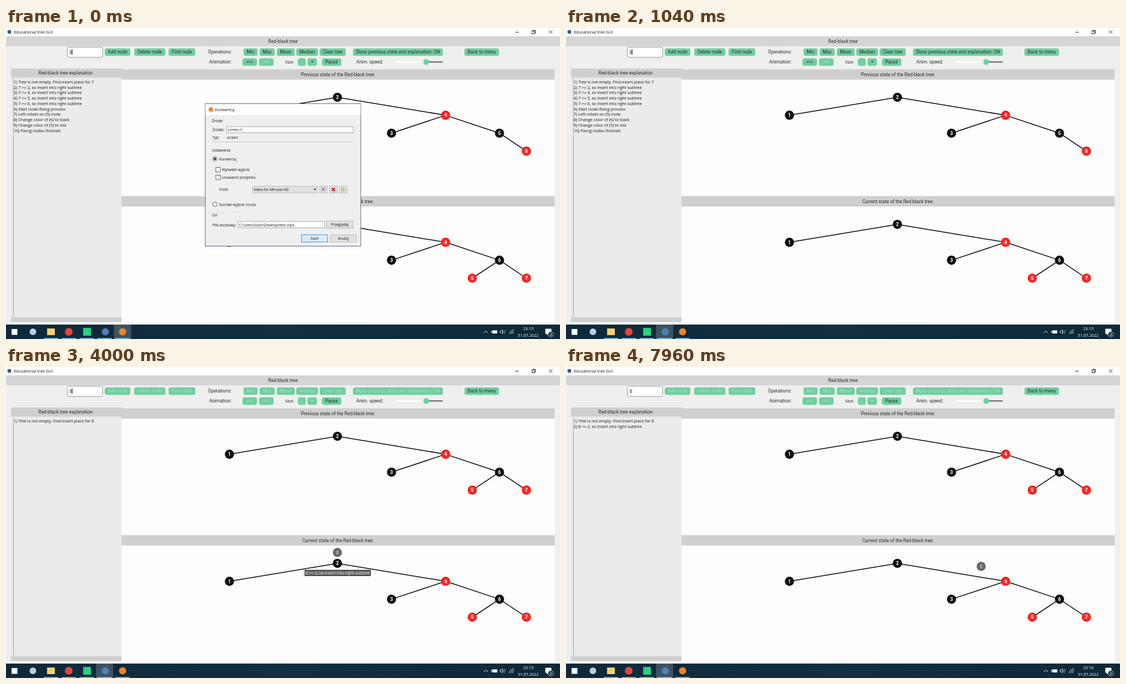
Recreate the animation shown at these times as an HTML page. Size 998x561 px, loop 8 s.

```html
<!DOCTYPE html>
<html lang="en">
<head>
<meta charset="utf-8">
<title>Educational tree GUI</title>
<style>
  html, body { margin: 0; width: 100%; height: 100%; overflow: hidden; background: #ededed; }
  svg { display: block; width: 998px; height: 561px; }
  text { font-family: "Open Sans", "Noto Sans", sans-serif; font-size: 7.3px; fill: #111; white-space: pre; }
  .label { font-family: Roboto, sans-serif; font-size: 8.35px; fill: #2b2b2b; }
  .small { font-size: 6.5px; }
  .key { font-family: Roboto, sans-serif; font-size: 8.6px; font-weight: 700; fill: #fff; }
  .off .label { fill: #a9dcc2; }
</style>
</head>
<body>
<svg id="stage" viewBox="0 0 998 561" xmlns="http://www.w3.org/2000/svg">
  <defs>
    <linearGradient id="bar">
      <stop offset="0" stop-color="#10283a"/>
      <stop offset=".5" stop-color="#112f40"/>
      <stop offset="1" stop-color="#0e2838"/>
    </linearGradient>
    <radialGradient id="red">
      <stop offset=".4" stop-color="#ff3030"/>
      <stop offset="1" stop-color="#f91212"/>
    </radialGradient>
  </defs>
</svg>
<script>
const LOOP = 8000, STEP = 40;
const DIALOG_END = 280, CLICK = 2720, INSERT = 2840, MINUTE = 4120, MOVE = 5704;
const SPEED = 0.0669, SLOPE = 0.1667;
const stage = document.getElementById('stage');

function add(parent, tag, attrs, content) {
  const el = document.createElementNS('http://www.w3.org/2000/svg', tag);
  for (const name in attrs) el.setAttribute(name, attrs[name]);
  if (content !== undefined) el.textContent = content;
  return parent.appendChild(el);
}
const group = (parent = stage) => add(parent, 'g', {});
const rect = (p, x, y, width, height, fill, extra) =>
  add(p, 'rect', { x, y, width, height, fill, ...extra });
const circle = (p, cx, cy, r, fill, extra) => add(p, 'circle', { cx, cy, r, fill, ...extra });
const path = (p, d, stroke, width = 1, fill = 'none') =>
  add(p, 'path', { d, stroke, fill, 'stroke-width': width });
// y is the middle of the capital letters
const text = (p, x, y, content, cls = '', extra) =>
  add(p, 'text', { x, y: y + 2.8, class: cls, ...extra }, content);
const centered = (p, x, y, content, cls, extra) =>
  text(p, x, y, content, cls, { 'text-anchor': 'middle', ...extra });
const show = (el, on) => el.setAttribute('visibility', on ? 'visible' : 'hidden');

// Window frame
rect(stage, 0, 0, 998, 535, '#efefef');
rect(stage, 0, 0, 998, 15, '#fff');
circle(stage, 6, 7, 3.5, '#2d5f93');
text(stage, 14, 7.3, 'Educational tree GUI', '', { style: 'font-size:7.4px' });
path(stage, 'M917 7.5h7M978 4l6.5 6.5M984.500 4l-6.500 6.500', '#222', .9);
path(stage, 'M947.5 5.500h5v5h-5zM949 5.500v-1.500h5v5h-1.500', '#222', .9);
rect(stage, 0, 15, 998, 18, '#d5d5d5', { rx: 3 });
centered(stage, 499, 24.5, 'Red-black tree', 'label');

// Toolbar
rect(stage, 110.5, 34.5, 63.500, 18.500, '#fff', { rx: 3, stroke: '#8f9396' });
text(stage, 114.5, 43.7, '8', 'label');
const caret = rect(stage, 118.6, 38.5, 1, 10, '#111');

function button(x1, x2, y, label) {
  const g = group();
  rect(g, x1, y - 6.8, x2 - x1, 13.6, '#6fcf9f', { rx: 3.5 });
  centered(g, (x1 + x2) / 2, y, label, 'label');
  return g;
}
const ROW1 = 43.5, ROW2 = 61.5;
const editButtons = [
  button(178, 224, ROW1, 'Add node'),
  button(231, 287, ROW1, 'Delete node'),
  button(293, 341, ROW1, 'Find node'),
  button(565, 612, ROW1, 'Clear tree')
];
const viewButtons = [
  button(428, 453, ROW1, 'Min'),
  button(457, 484, ROW1, 'Max'),
  button(488, 520, ROW1, 'Mean'),
  button(523, 562, ROW1, 'Median'),
  button(625, 787, ROW1, 'Show previous state and explanation: ON'),
  button(426, 452, ROW2, '<<<'),
  button(543, 560, ROW2, '+')
];
button(456, 482, ROW2, '>>>').classList.add('off');
button(526, 540, ROW2, '-').classList.add('off');
button(569, 604, ROW2, 'Pause');
button(826, 888, ROW1, 'Back to menu');
text(stage, 364, ROW1, 'Operations:', 'label');
text(stage, 366, ROW2, 'Animation:', 'label');
text(stage, 503, ROW2, 'Size:', '', { style: 'font-size:7.6px' });
text(stage, 631, ROW2, 'Anim. speed:', 'label');
rect(stage, 702, 60, 56, 2.600, '#fff', { rx: 1.3 });
rect(stage, 757, 60, 30, 2.600, '#777', { rx: 1.3 });
circle(stage, 757, 61.3, 5.3, '#6fcf9f');

// Explanation panel
rect(stage, 9, 73, 199, 457, '#ebebeb');
rect(stage, 9, 73, 199, 16.5, '#cfcfcf');
centered(stage, 107.5, 81.3, 'Red-black tree explanation', 'label');
rect(stage, 13, 91, .8, 430, '#8c8c8c');
rect(stage, 9, 522, 199, 8, '#cecece');

function lines(list) {
  const g = group();
  return list.map((line, i) => text(g, 14, 97 + i * 9.75, `${i + 1}) ${line}`));
}
const goRight = (key, than) => `${key} >= ${than}, so insert into right subtree`;
const findPlace = key => `Tree is not empty. Find insert place for ${key}`;
const oldLines = lines([
  findPlace(7), ...[2, 4, 5, 6].map(n => goRight(7, n)),
  'Start node-fixing process', 'Left-rotate on (5) node', 'Change color of (6) to black',
  'Change color of (5) to red', 'Fixing nodes finished'
]);
const newLines = lines([findPlace(8), goRight(8, 2)]);

// Tree views
function view(top, title) {
  rect(stage, 208, top, 780.5, 228, '#fdfdfd');
  rect(stage, 208, top, 780.5, 18.5, '#cfcfcf');
  centered(stage, 598, top + 9.6, title, 'label');
}
view(74.5, 'Previous state of the Red-black tree:');
view(303.5, 'Current state of the Red-black tree:');

function node(parent, x, y, key, fill) {
  circle(parent, x, y, 8.3, fill);
  centered(parent, x, y + .3, key, 'key');
}
// Each entry: key, x, depth, colour, index of parent
function tree(rootY, entries) {
  const g = group();
  const y = depth => rootY + depth * 32.35;
  for (const [, x, depth, , up] of entries) {
    if (up === undefined) continue;
    const [, px, pd] = entries[up];
    path(g, `M${px} ${y(pd)}L${x} ${y(depth)}`, '#000', 1.5);
  }
  for (const [key, x, depth, fill] of entries) node(g, x, y(depth), key, fill);
  return g;
}
const BLACK = '#121212', RED = 'url(#red)';
const base = [[2, 597, 0, BLACK], [1, 402.5, 1, BLACK, 0], [4, 792, 1, RED, 0], [3, 694.5, 2, BLACK, 2]];
const before = [...base, [5, 889, 2, BLACK, 2], [6, 937.5, 3, RED, 4]];
const after = [...base, [6, 889, 2, BLACK, 2], [5, 840, 3, RED, 4], [7, 937.5, 3, RED, 4]];
const oldTree = tree(125, before);
const newTree = tree(125, after);
tree(354.2, after);

const inserted = group();
circle(inserted, 0, 0, 8.2, '#686868');
centered(inserted, 0, .2, '8', 'label', { style: 'fill:#dcdcdc' });
const tip = group();
rect(tip, 538.5, 366.5, 118, 10, '#6b6b6b', { stroke: '#1c1c2c' });
centered(tip, 597.5, 371.5, goRight(8, 2), '', { style: 'font-size:7.4px;fill:#e8e8e8' });

// Taskbar
rect(stage, 0, 535, 998, 26, 'url(#bar)');
const focusMark = rect(stage, 162, 535, 31, 26, '#3d5362');
rect(stage, 10, 543, 10.5, 10.5, '#fff');
circle(stage, 48.5, 548, 6, '#b9cfdc');
rect(stage, 74, 542, 14, 12, '#f7d06a');
circle(stage, 113, 548, 7, '#e0483b');
rect(stage, 139, 541, 14, 14, '#22d37f');
circle(stage, 179, 548, 6.5, '#4b83b4');
circle(stage, 210, 548, 6.5, '#f58220');
for (let i = 0; i < 5; i++) rect(stage, 68 + i * 32.2, 559.3, 26, 1.700, '#76b9ed');
path(stage, 'M861 550l3.500-3.500 3.500 3.500', '#fff');
rect(stage, 876, 545.5, 9, 5.500, '#fff');
path(stage, 'M874.5 546v4', '#fff');
path(stage, 'M890 546.500h2l2.500-2.500v8l-2.500-2.500h-2z', '#fff', .8);
path(stage, 'M896 546q1.500 2 0 4M898 544.500q3 3.500 0 7', '#bcc8cf', .8);
path(stage, 'M907 552a8 8 0 0 1 8-8M909.500 552a5.500 5.500 0 0 1 5.500-5.500M912 552a3 3 0 0 1 3-3', '#dce3e7', .9);
const white = { style: 'fill:#fff' };
const clock = centered(stage, 941, 542, '23:15', '', white);
centered(stage, 940.7, 553.7, '31.07.2022', '', white);
path(stage, 'M972 543h10v8h-5l-2.500 2.500v-2.500h-2.500z', '#fff', 1, '#fff');
circle(stage, 981.5, 552.5, 5, '#263b48', { stroke: '#dce3e7', 'stroke-width': .7 });
centered(stage, 981.5, 552.4, '2', 'small', white);

// Conversion dialog
const dialog = group();
const small = (x, y, content) => text(dialog, x, y - .3, content, 'small');
const field = (x, y, w, h, fill = '#fff', stroke = '#8a8a8a') =>
  rect(dialog, x, y, w, h, fill, { stroke, 'stroke-width': .8 });
function pushButton(x, y, w, label, fill = '#e1e1e1', stroke = '#adadad') {
  field(x, y, w, 13, fill, stroke);
  centered(dialog, x + w / 2, y + 6.2, label, 'small');
}
rect(dialog, 359, 136.5, 280, 257, '#efefef', { stroke: '#62667c' });
rect(dialog, 359.5, 137, 279, 20, '#fff');
circle(dialog, 369, 147, 4, '#f58220');
text(dialog, 376.5, 147, 'Konwertuj');
small(371, 167.5, 'Źródło');
small(372, 183.7, 'Źródło:');
field(397.5, 178, 228, 11);
small(399.5, 183.7, 'screen://');
small(372, 197.3, 'Typ:');
small(398, 197.3, 'screen');
path(dialog, 'M371 205.500h255', '#bbb', .8);
small(371, 220.5, 'Ustawienia');
for (const y of [236, 318]) circle(dialog, 376.3, y, 4, '#fff', { stroke: '#333', 'stroke-width': .8 });
circle(dialog, 376.3, 236, 2.2, '#222');
small(384, 236.3, 'Konwertuj');
for (const y of [251.5, 265.5]) field(378, y, 8, 8, '#fff', '#333');
small(389, 255.7, 'Wyświetl wyjście');
small(389, 269.7, 'Usuwanie przeplotu');
small(384, 291.3, 'Profil');
field(444.5, 285.5, 116, 11.5, '#e1e1e1', '#adadad');
small(446, 291.4, 'Video for Mirvole HD');
path(dialog, 'M554 290h5l-2.500 2.700z', 'none', 0, '#222');
for (const x of [565, 583, 600.5]) field(x, 285, 13.5, 12.5, '#e1e1e1', '#adadad');
path(dialog, 'M569 288.500l5.500 5.500M574.500 288.500l-5.500 5.500', '#777', 1.3);
path(dialog, 'M587 288.500l5.500 5.500M592.500 288.500l-5.500 5.500', '#cf1020', 2.2);
rect(dialog, 604, 288, 6, 7, '#b9c7a0');
small(384, 318.3, 'Surowe wyjście zrzutu');
path(dialog, 'M371 332.500h255', '#ddd', .8);
small(371, 337.5, 'Cel');
small(372, 355.3, 'Plik docelowy:');
field(418, 349, 156, 11.5);
small(420, 355.3, 'C:\\Users\\Gość\\Desktop\\test.mp4');
pushButton(577.5, 348.3, 47.5, 'Przeglądaj');
pushButton(532.3, 373, 47, 'Start', '#dcebf8', '#0078d7');
pushButton(584.5, 373, 46.5, 'Anuluj');

function draw(t) {
  const inDialog = t < DIALOG_END, running = t >= INSERT;
  show(dialog, inDialog);
  focusMark.setAttribute('x', inDialog ? 194.5 : 162);
  show(caret, (t + 70) % 900 < 600);
  editButtons.forEach(b => b.classList.toggle('off', t >= CLICK));
  viewButtons.forEach(b => b.classList.toggle('off', running));
  oldLines.forEach(line => show(line, !running));
  show(newLines[0], running);
  show(newLines[1], t >= MOVE);
  show(oldTree, !running);
  show(newTree, running);
  show(inserted, running);
  show(tip, running && t < MOVE);
  const dx = Math.max(0, t - MOVE) * SPEED;
  inserted.setAttribute('transform', `translate(${597 + dx} ${334.5 + dx * SLOPE})`);
  clock.textContent = t < MINUTE ? '23:15' : '23:16';
}

const start = performance.now();
function tick() {
  const t = (performance.now() - start) % LOOP;
  draw(Math.floor(t / STEP) * STEP);
  requestAnimationFrame(tick);
}
draw(0);
requestAnimationFrame(tick);
</script>
</body>
</html>
```
